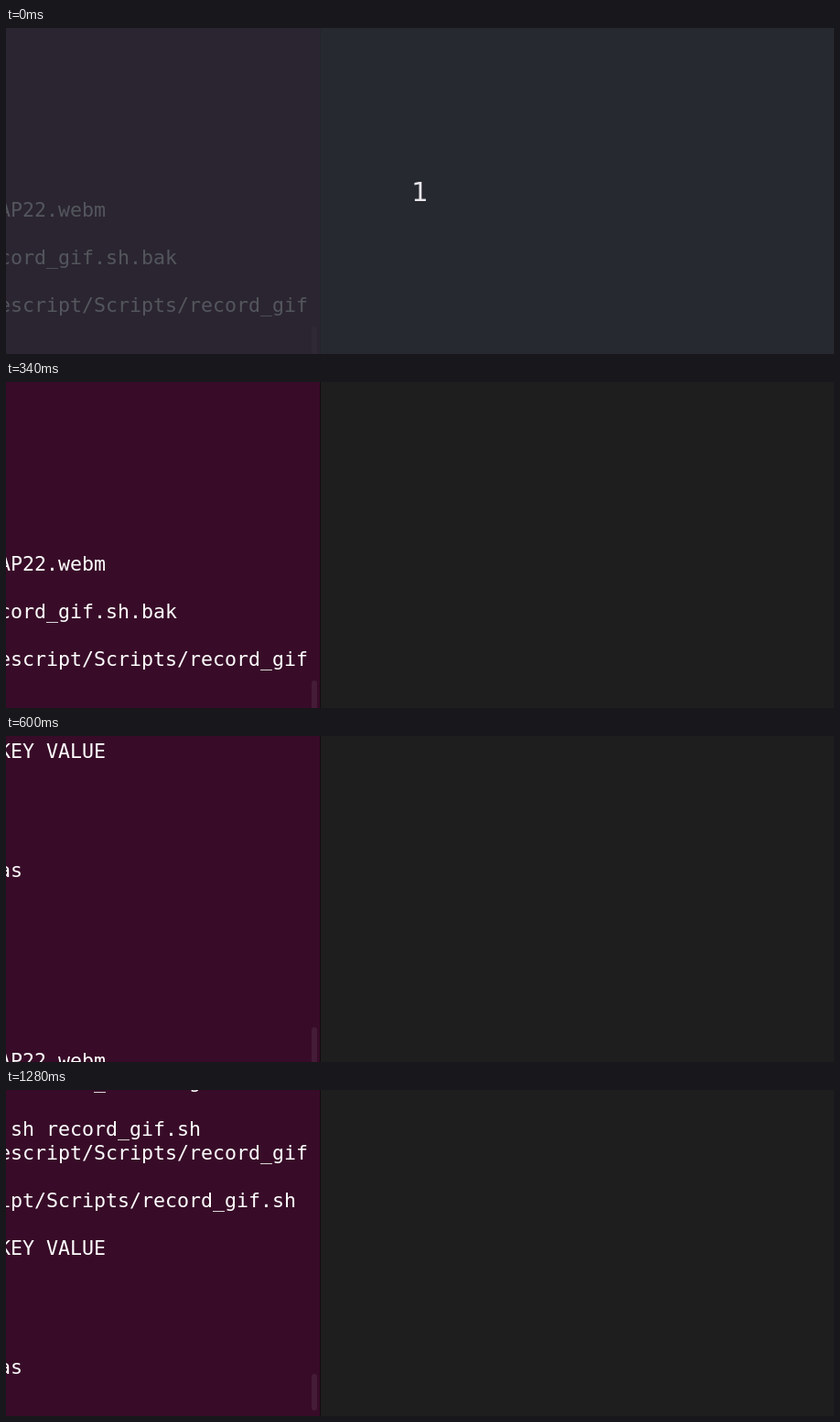
Animation, 905 px wide and 356 px high, one loop 1600 ms. Source, as an HTML page:

```html
<!DOCTYPE html>
<html lang="en">
<head>
<meta charset="utf-8">
<title>Terminal scroll</title>
<style>
  html, body { margin: 0; width: 100%; height: 100%; overflow: hidden; background: #1e1e1e; }
  svg { display: block; width: 905px; height: 356px; }
  #lines { font: 21.6px "DejaVu Sans Mono", monospace; fill: #fff; white-space: pre; }
  #count { font: 28.8px "DejaVu Sans", sans-serif; fill: #e9e6ec; text-anchor: middle; }
</style>
</head>
<body>
<svg viewBox="0 0 905 356">
  <rect width="905" height="356" fill="#1e1e1e"/>
  <rect width="343" height="356" fill="#380c28"/>
  <rect x="343" width="1" height="356" fill="#140a10"/>
  <g id="lines"></g>
  <rect id="thumb" x="334" width="6" height="40" rx="3" fill="#451c38"/>
  <g id="veil">
    <rect width="905" height="356" fill="#282c34" fill-opacity=".8"/>
    <text id="count" x="452.5" y="189">1</text>
  </g>
</svg>
<script>
const LOOP = 1600, ROW = 26, LEFT = -8;
const VEIL_END = 100, SCROLL_START = 500, STEP = 100, STEPS = 4, ROWS_PER_STEP = 3;

// Terminal rows, counted from the top of the fully scrolled view
const rows = {
  0: "  record_video1.gif",
  2: " sh record_gif.sh",
  3: "escript/Scripts/record_gif",
  5: "ipt/Scripts/record_gif.sh",
  7: "KEY VALUE",
  12: "as",
  20: "AP22.webm",
  22: "cord_gif.sh.bak",
  24: "escript/Scripts/record_gif"
};

const $ = id => document.getElementById(id);
const lines = $("lines"), thumb = $("thumb"), veil = $("veil");

for (const [row, str] of Object.entries(rows)) {
  const el = document.createElementNS("http://www.w3.org/2000/svg", "text");
  el.setAttribute("x", LEFT);
  el.setAttribute("y", row * ROW - 2);
  el.style.whiteSpace = "pre";
  el.textContent = str;
  lines.append(el);
}

function draw(ms) {
  const t = ms % LOOP;
  const step = Math.max(0, Math.min(STEPS, Math.floor((t - SCROLL_START) / STEP) + 1));
  const shift = (step - STEPS) * ROWS_PER_STEP * ROW;
  lines.setAttribute("transform", `translate(0 ${shift})`);
  thumb.setAttribute("y", 326 - 4 * step);
  veil.setAttribute("visibility", t < VEIL_END ? "visible" : "hidden");
}

const start = performance.now();
function tick() {
  draw(performance.now() - start);
  requestAnimationFrame(tick);
}
draw(0);
requestAnimationFrame(tick);
</script>
</body>
</html>
```
